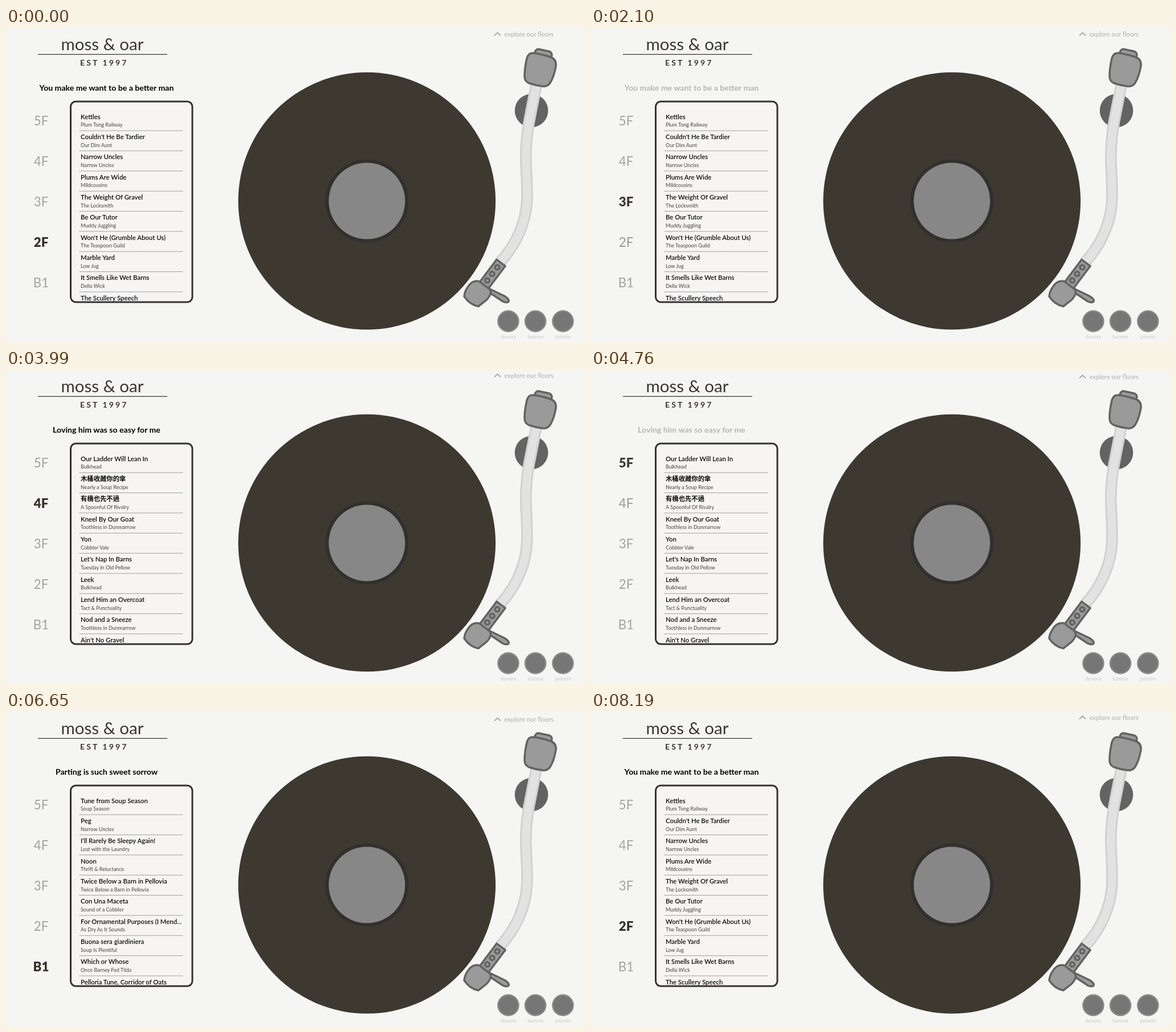
An HTML page for the animation above (8260 ms loop, 1016 by 551 pixels).

```html
<!DOCTYPE html>
<html lang="en">
<head>
<meta charset="utf-8">
<title>Record floors</title>
<style>
html, body { margin: 0; width: 100%; height: 100%; overflow: hidden; background: #f5f5f3; }
svg { display: block; width: 100vw; height: 100vh; }
text { font-family: Lato, "Noto Sans CJK TC", "Noto Sans CJK SC", "Noto Sans CJK JP", "Open Sans", sans-serif; }
.mid { text-anchor: middle; }
.song { font-size: 11.35px; font-weight: 600; fill: #0c0c0c; }
.film { font-size: 9px; fill: #444; }
.rule { stroke: #4a4a4a; stroke-width: 1; stroke-dasharray: 1 1; }
.metal { fill: #9a9a9a; stroke: #636363; stroke-width: 3.5; stroke-linejoin: round; }
.key { fill: #767676; stroke: #898989; stroke-width: 2.5; }
.tag { font-size: 9px; fill: #c9c9c9; text-anchor: middle; }
</style>
</head>
<body>
<svg viewBox="0 0 1016 551" preserveAspectRatio="none">
  <defs>
    <clipPath id="inside"><rect x="114" y="129" width="212" height="351" rx="8"/></clipPath>
    <path id="tube" fill="none" d="M931 98L921.5 146C914 180 912 205 912.2 230C913 255 915 275 914.3 300C913 340 896 380 866 412"/>
  </defs>
  <rect width="1016" height="551" fill="#f5f5f3"/>

  <text class="mid" x="169" y="38.5" font-size="29.5" fill="#3a3733">moss &amp; oar</text>
  <path d="M56 46.4H283" stroke="#3a3733" stroke-width="1.2"/>
  <text x="130" y="66" font-size="14" font-weight="700" letter-spacing="3.1" fill="#3a3733">EST 1997</text>

  <text id="quote" class="mid" x="176.5" y="109.5" font-size="14.1" font-weight="700"></text>
  <g id="floors"></g>

  <rect x="113.5" y="129" width="213.5" height="352" rx="9" fill="#f6f5f4"/>
  <g id="list" clip-path="url(#inside)"></g>
  <rect x="113.5" y="129" width="213.5" height="352" rx="9" fill="none" stroke="#36322f" stroke-width="3"/>

  <circle cx="633.3" cy="303.5" r="225.8" fill="#3d3931"/>
  <circle cx="633.3" cy="303.5" r="73" fill="#31302d"/>
  <circle cx="633.3" cy="303.5" r="67" fill="#878787"/>

  <circle cx="922" cy="145" r="29.3" fill="#636363"/>
  <use href="#tube" stroke="#d1d1d1" stroke-width="20.6"/>
  <use href="#tube" stroke="#e2e2e2" stroke-width="14.6"/>
  <g class="metal">
    <rect x="928" y="39" width="30" height="16" rx="6" transform="rotate(12 943 45)"/>
    <path d="M925 44C936 45 946 48 954 50.5Q966 54 965 66C963 78 960 88 955 96Q950 104 940 102C932 101 924 99 917 96.5Q909 93 910 82C910 72 912 62 914 53Q917 43 925 44Z"/>
    <path d="M847 457L875 470.5Q884 476 882 480Q879 483 872 480L848 464Z"/>
    <rect x="-9.5" y="-25" width="19" height="50" transform="translate(853.5 432) rotate(37)"/>
    <path d="M826 444Q832 444 836 449L847 457Q852 461 850 467C846 478 838 480 829 488.5Q814 486 804 471Q805 462 810 455C814 448 819 444 826 444Z"/>
    <circle cx="862" cy="420" r="4"/>
    <circle cx="853" cy="431.5" r="4"/>
    <circle cx="844.5" cy="443" r="4"/>
  </g>

  <circle class="key" cx="881.4" cy="514.5" r="18"/>
  <circle class="key" cx="929" cy="514.5" r="18"/>
  <circle class="key" cx="977.3" cy="514.5" r="18"/>
  <text class="tag" x="881.4" y="545">dovora</text>
  <text class="tag" x="929" y="545">tumme</text>
  <text class="tag" x="977.3" y="545">pelorin</text>

  <g id="explore">
    <path d="M857 -1.5L862.5 -6.5L868 -1.5" fill="none" stroke="#aaa" stroke-width="2"/>
    <text x="874.5" y="0" font-size="11.1" font-weight="500" fill="#b4b4b4">explore our floors</text>
  </g>
</svg>
<script>
const NS = "http://www.w3.org/2000/svg";
const $ = id => document.getElementById(id);

// Each line holds a song and its film; a lone name serves as both.
const floors = [
  { name: "5F", y: 171, quote: "Lighting could strike", songs: `The Spare Six Buckets|Among Thrift and Clamour
Luncheon At Morwenna's|Luncheon at Morwenna's
The Wheelbarrows Of Plonvec
Leanover|Greet Ned Ochre
Alpine Errand Opening Tune|Alpine Errand
Yawning Tourney|Kind Ned Gardening
Sit There|During Teatime
Darum schwieg Balthorin|3047:A Cellar Voyage
Serenade in F Minor for Bassoon,...|Tolley Vs. Tolley
Lucan Declines The Soup / Stroll I...|` },
  { name: "4F", y: 242.3, quote: "Loving him was so easy for me", songs: `Our Ladder Will Lean In|Bulkhead
木桶收藏你的傘|Nearly a Soup Recipe
有橋也先不過|A Spoonful Of Rivalry
Kneel By Our Goat|Toothless in Dunmarrow
Yon|Cobbler Vale
Let's Nap In Barns|Tuesday In Old Pellow
Leek|Bulkhead
Lend Him an Overcoat|Tact & Punctuality
Nod and a Sneeze|Toothless in Dunmarrow
Ain't No Gravel|` },
  { name: "3F", y: 313.3, quote: "To make each day count", songs: `Our Plumber's Umbrella|Tact & Punctuality
The Mending of the Wheelbarrow|Bricklayer in Doubt
Gravel Rolls Beneath It
Hay Loft|Pellows Gate
Haymaking In January
Whistle Gently Niece|The Stepuncle
Gardener of Soup|Sulking Goat
Tune From Tram Painter|Tram Painter
Evaporations|Pebbly
鹹豆豆|` },
  { name: "2F", y: 384, quote: "You make me want to be a better man", songs: `Kettles|Plum Tong Railway
Couldn't He Be Tardier|Our Dim Aunt
Narrow Uncles
Plums Are Wide|Mildcousins
The Weight Of Gravel|The Locksmith
Be Our Tutor|Muddy Juggling
Won't He (Grumble About Us)|The Teaspoon Guild
Marble Yard|Low Jug
It Smells Like Wet Barns|Della Wick
The Scullery Speech|` },
  { name: "B1", y: 455.3, quote: "Parting is such sweet sorrow", songs: `Tune from Soup Season|Soup Season
Peg|Narrow Uncles
I'll Rarely Be Sleepy Again!|Lost with the Laundry
Noon|Thrift & Reluctance
Twice Below a Barn in Pellovia
Con Una Maceta|Sound of a Cobbler
For Ornamental Purposes (I Mend...|As Dry As It Sounds
Buona sera giardiniera|Soup Is Plentiful
Which or Whose|Once Barney Fed Tilda
Pelloria Tune, Corridor of Oats|` }
];

const LOOP = 8260, STEP = 70, FADE = 315, GLOW = 220, BOB = 1050;
// Start time and index of the floor chosen
const visits = [[-2000, 3], [1960, 2], [3245, 1], [4620, 0], [5900, 4], [6950, 3]];

function add(parent, tag, attrs, label) {
  const el = document.createElementNS(NS, tag);
  for (const key in attrs) el.setAttribute(key, attrs[key]);
  if (label) el.textContent = label;
  parent.appendChild(el);
  return el;
}

// The CSS "ease" curve, cubic-bezier(.25, .1, .25, 1)
function ease(x) {
  if (x <= 0) return 0;
  if (x >= 1) return 1;
  let lo = 0, hi = 1;
  for (let i = 0; i < 20; i++) {
    const s = (lo + hi) / 2, r = 1 - s;
    if (0.75 * s * r + s ** 3 < x) lo = s; else hi = s;
  }
  const r = 1 - lo;
  return 0.3 * lo * r * r + 3 * lo * lo * r + lo ** 3;
}

const mix = (a, b, p) => a.map((v, i) => Math.round(v + (b[i] - v) * p));

const labels = floors.map(f => add($("floors"), "text", { class: "mid", x: 61.5, y: f.y, "font-size": 22.3 }, f.name));

const lists = floors.map(f => {
  const g = add($("list"), "g", {});
  f.songs.split("\n").forEach((line, i) => {
    const [song, film = song] = line.split("|");
    const y = 159.6 + i * 35.35;
    add(g, "text", { class: "song", x: 131, y }, song);
    add(g, "text", { class: "film", x: 131, y: y + 13.6 }, film);
    add(g, "path", { class: "rule", d: `M129 ${y + 20.6}H311` });
  });
  return g;
});

let shown = -1;
function show(index) {
  if (index === shown) return;
  shown = index;
  lists.forEach((g, i) => g.setAttribute("display", i === index ? "inline" : "none"));
  $("quote").textContent = floors[index].quote;
}

function draw(t) {
  let k = visits.length - 1;
  while (k > 0 && t < visits[k][0]) k--;
  const [start, now] = visits[k];
  const before = k ? visits[k - 1][1] : now;
  const age = t - start;
  const glow = ease(age / GLOW);

  labels.forEach((el, i) => {
    const lit = i === now ? glow : i === before ? 1 - glow : 0;
    el.setAttribute("fill", `rgb(${mix([163, 163, 163], [54, 50, 43], lit)})`);
    el.setAttribute("font-weight", 400 + Math.round(lit * 5) * 100);
  });

  const leaving = age < FADE;
  show(leaving ? before : now);
  $("quote").setAttribute("fill-opacity", leaving ? 1 - ease(age / FADE) : ease((age - FADE) / FADE));

  const y = 15.4 + 1.7 * Math.cos(2 * Math.PI * (t - 322) / BOB);
  $("explore").setAttribute("transform", `translate(0 ${y.toFixed(2)})`);
}

function tick() {
  const t = performance.now() % LOOP;
  draw(Math.floor(t / STEP) * STEP);
  requestAnimationFrame(tick);
}
tick();
</script>
</body>
</html>
```
